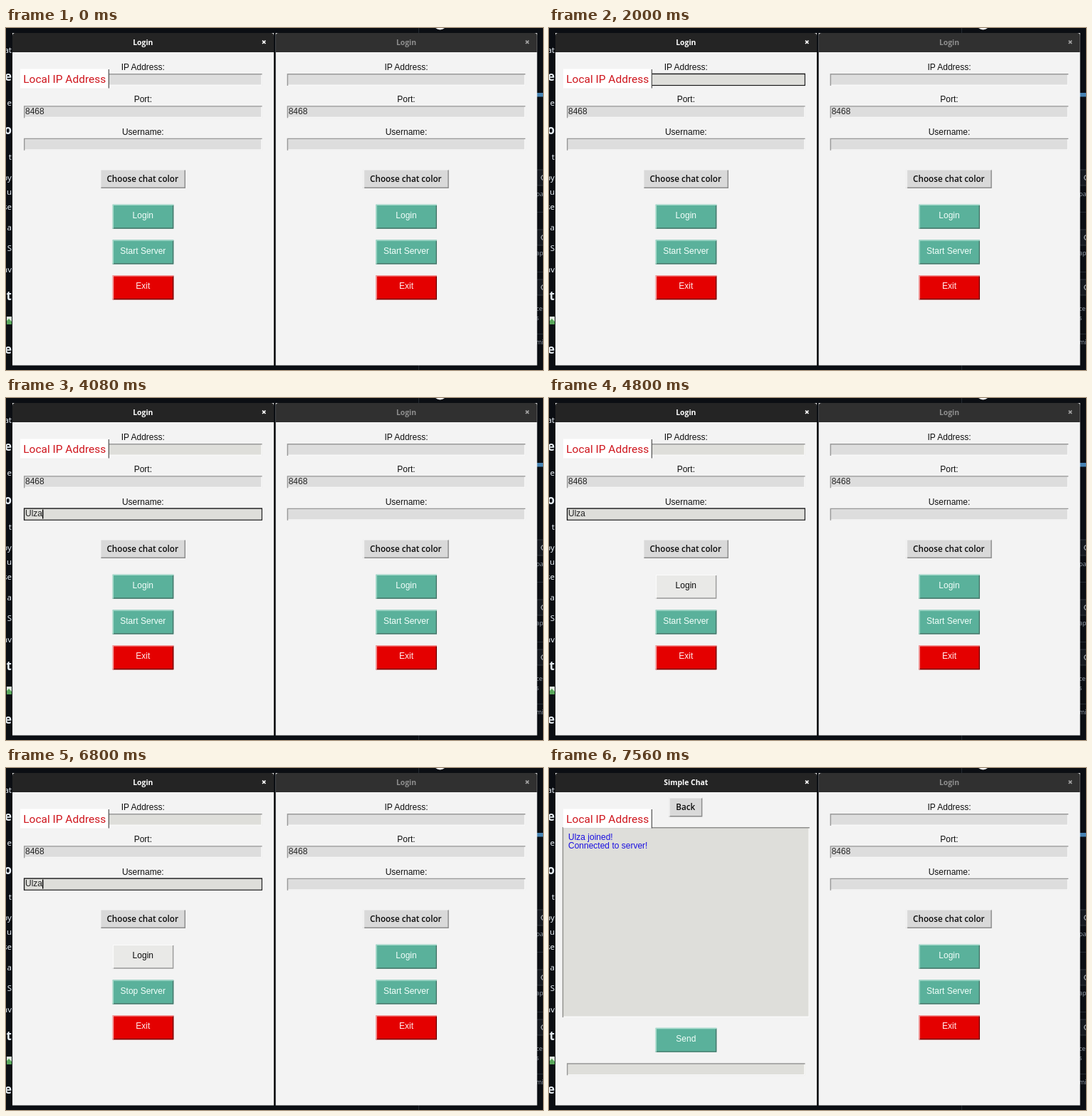
Recreate the animation shown at these times as an HTML page. Size 754 by 480 pixels, loop 8 s.

```html
<!DOCTYPE html>
<html lang="en">
<head>
<meta charset="utf-8">
<title>Chat login</title>
<style>
html, body { margin: 0; width: 100%; height: 100%; overflow: hidden; background: #0b0e13; }
svg { display: block; width: 754px; height: 480px; }
text { white-space: pre; }
.ui { font: 12px "Liberation Sans", Arial, sans-serif; }
.btn { font: 600 11.7px "Open Sans", "Noto Sans", sans-serif; }
.title { font: 700 10.4px "Open Sans", "Noto Sans", sans-serif; }
.tag { font: 15.5px Roboto, sans-serif; }
.page { font: 11.5px "Noto Sans", sans-serif; }
.head { font: 700 17px "Noto Sans", sans-serif; }
.small { font: 9px "Noto Sans", sans-serif; }
</style>
</head>
<body>
<svg id="stage" viewBox="0 0 754 480" xmlns="http://www.w3.org/2000/svg">
  <g id="page"></g>
  <g id="left"></g>
  <g id="right" transform="translate(369.7 0)"></g>
  <g id="tag"></g>
</svg>
<script>
const LOOP = 8000;
const USER = 'Ulza';
const CENTER = 192.3;
const GREEN = { fill: '#5ab19b', light: '#a9dccd', dark: '#48776b', ink: '#f4fffb' };
const RED = { fill: '#e40000', light: '#f6b4b4', dark: '#760000', ink: '#ffecec' };
const GRAY = { fill: '#d9d9d9', light: '#f4f4f4', dark: '#8c8c8c', ink: '#0c0c0c' };
const HOVER = { fill: '#e9e9e7', light: '#fbfbfb', dark: '#9a9a99', ink: '#0c0c0c' };

const $ = id => document.getElementById(id);
const rect = (x, y, w, h, fill, more = '') =>
  `<rect x="${x}" y="${y}" width="${w}" height="${h}" fill="${fill}" ${more}/>`;
const text = (x, y, s, fill, cls = 'ui', anchor = 'start', more = '') =>
  `<text x="${x}" y="${y}" fill="${fill}" class="${cls}" text-anchor="${anchor}" ${more}>${s}</text>`;
const mid = (y, s, fill, cls) => text(CENTER, y, s, fill, cls, 'middle');

// Box with separate colours for the top-left and bottom-right edges
function bevel(x, y, w, h, fill, topLeft, bottomRight, line = 1.4) {
  const r = x + w, b = y + h, o = line / 2;
  return rect(x, y, w, h, fill) +
    `<path d="M${r - o} ${y + o}V${b - o}H${x}" fill="none" stroke="${bottomRight}" stroke-width="${line}"/>` +
    `<path d="M${x + o} ${b}V${y + o}H${r}" fill="none" stroke="${topLeft}" stroke-width="${line}"/>`;
}

function button(x, y, w, h, label, look, cls = 'ui', pressed = false) {
  const edges = pressed ? [look.dark, look.light] : [look.light, look.dark];
  const base = cls === 'btn' ? y + 18 : y + 19.2;
  const shift = pressed ? 1 : 0;
  return bevel(x, y, w, h, look.fill, ...edges) +
    text(CENTER - (cls === 'btn' ? 0.6 : 0) + shift, base + shift, label, look.ink, cls, 'middle');
}

function entry(y, value, focus, used) {
  let s = bevel(25, y, 334.5, 17, used ? '#dededa' : '#dddddd', '#999', '#f8f8f8');
  if (focus) s += rect(25.5, y + 0.3, 333.8, 16.2, 'none', 'stroke="#141414" stroke-width="1.2"');
  return s + text(27, y + 11.3, value, '#242424');
}

function frame(title, active) {
  return rect(9, 7, 367, 466.5, '#f3f3f3') +
    `<path d="M9 34V11q0-4 4-4H372q4 0 4 4V34Z" fill="${active ? '#242424' : '#303030'}"/>` +
    mid(23.6, title, active ? '#fff' : '#8f8f8f', 'title') +
    `<path d="M360 17.6l4.4 4.4m0-4.4l-4.4 4.4" stroke="${active ? '#fff' : '#a5a5a5'}" stroke-width="1.6"/>`;
}

function loginForm(s) {
  const ink = '#101010';
  let out = mid(58.8, 'IP Address:', ink) + entry(64, '', s.focus === 'ip', s.focus) +
    mid(104, 'Port:', ink) + entry(109.2, '8468') +
    mid(149.8, 'Username:', ink) + entry(154.7, s.name, s.focus === 'user', s.focus === 'user');
  if (s.caret) out += rect(27 + s.caretX, 156.5, 1.4, 13, '#000');
  return out +
    button(132, 198, 120, 27, 'Choose chat color', s.hover === 'color' ? HOVER : GRAY, 'btn') +
    button(149.7, 247.7, 85.6, 34, 'Login', s.hover === 'login' ? HOVER : GREEN, 'ui', s.press === 'login') +
    button(149.7, 297.4, 85.6, 34, s.server, s.hover === 'server' ? HOVER : GREEN, 'ui', s.press === 'server') +
    button(149.7, 347.2, 85.6, 34, 'Exit', RED);
}

function chatView(ready) {
  if (!ready) return rect(168, 41, 47.5, 28, '#d8d7d6');
  return button(168.3, 41, 47, 27.5, 'Back', GRAY, 'btn') +
    bevel(18.8, 83, 347, 267, '#dededa', '#8f8f8d', '#fafafa') +
    text(27, 100.8, USER + ' joined!', '#1a0fe0') +
    text(27, 112.9, 'Connected to server!', '#1a0fe0') +
    button(149.7, 364.8, 85.6, 34, 'Send', GREEN) +
    entry(414.3, '', false, true);
}

const within = (t, ...spans) => spans.some(([a, b]) => t >= a && t < b);

// Caret widths follow the 12px interface font
const caretStops = [0, 8.7, 11.3, 17.3, 24];
const keyTimes = [3240, 3400, 3560, 3720];

function stateAt(t) {
  const typed = keyTimes.filter(k => t >= k).length;
  const hover = within(t, [4720, 4760]) ? 'color'
    : within(t, [4800, 5000], [6520, 7520]) ? 'login'
    : within(t, [5080, 6280]) ? 'server' : '';
  return {
    view: t >= 7560 ? 'chat' : t >= 7520 ? 'loading' : 'login',
    focus: t >= 2280 ? 'user' : t >= 840 ? 'ip' : '',
    name: USER.slice(0, typed),
    caretX: caretStops[typed],
    caret: within(t, [2280, 2880], [3200, 3800], [4080, 4720], [5000, 5600],
      [5880, 6480], [6800, 7400]),
    hover,
    press: within(t, [5880, 6000]) ? 'server' : within(t, [7320, 7440]) ? 'login' : '',
    server: t >= 6040 ? 'Stop Server' : 'Start Server'
  };
}

function pageBehind() {
  const light = '#e6edf3', gray = '#8b949e';
  let s = rect(0, 0, 754, 480, '#0b0e13') + rect(579, 0, 1, 480, '#242a31') +
    '<circle cx="609.5" cy="-7" r="9.5" fill="#f0f0f0"/>';
  const words = [['at', 35], ['re', 74, 'head'], ['e', 109], ['o', 149, 'head'], ['t', 185],
    ['py', 214, 'page', 1], ['u', 234, 'page', 1], ['se', 255], ['a', 284], ['S', 313],
    ['av', 343], ['nt', 382, 'head'], ['e', 457, 'head']];
  for (const [w, y, cls = 'page', slant] of words)
    s += text(8, y, w, light, cls, 'end', slant ? 'font-style="italic"' : '');
  s += rect(1, 405, 7, 11, '#dfe9df') + '<path d="M1 416v-5l3-3 4 4v4Z" fill="#58a65a"/>';
  s += rect(745, 91, 9, 5.5, '#4783b2');
  for (const y of [199, 283, 353])
    s += rect(742, y, 30, 22, '#15191f', 'rx="5" stroke="#30363d"') +
      `<circle cx="755" cy="${y + 11}" r="3.5" fill="none" stroke="#d5dae0"/>`;
  for (const y of [258, 342, 429]) s += rect(745, y, 9, 1, '#242a31');
  for (const [w, y] of [['pa', 236], ['ap', 319], ['ce', 397], ['s', 410], ['mi', 444]])
    s += text(744, y, w, gray, 'small');
  return s;
}

$('page').innerHTML = pageBehind();
$('right').innerHTML = frame('Login', false) +
  loginForm({ name: '', server: 'Start Server' });
$('tag').innerHTML = rect(20, 57.5, 124.5, 27, '#fff') + rect(143.8, 58, 1, 26.5, '#333') +
  text(24.2, 77, 'Local IP Address', '#cf151d', 'tag');

let shown = '';
function draw(now) {
  const s = stateAt(now % LOOP);
  const key = JSON.stringify(s);
  if (key !== shown) {
    shown = key;
    const inLogin = s.view === 'login';
    $('left').innerHTML = frame(inLogin ? 'Login' : 'Simple Chat', true) +
      (inLogin ? loginForm(s) : chatView(s.view === 'chat'));
  }
  requestAnimationFrame(draw);
}
draw(performance.now());
</script>
</body>
</html>
```
